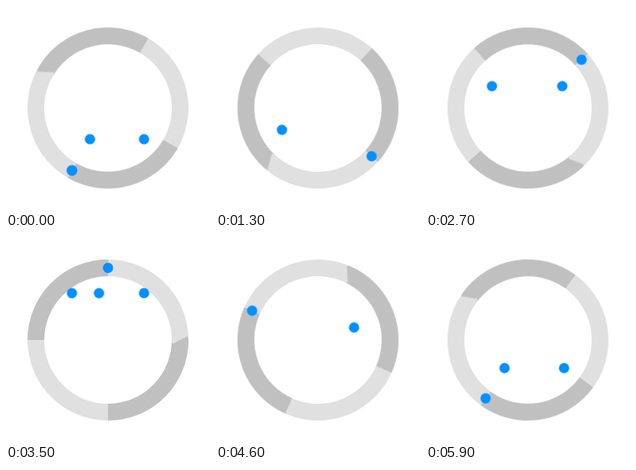
Animation, 256 px wide and 256 px high, one loop 6 s. Source, as an HTML page:

```html
<!DOCTYPE html>
<html lang="en">
<head>
<meta charset="utf-8">
<title>Straight flights inside a rotating ring</title>
<style>
  html, body { margin: 0; width: 100%; height: 100%; overflow: hidden; background: #fff; }
  svg { display: block; width: 100%; height: 100%; }

  .ring { fill: none; stroke-width: 21; }
  .light { stroke: #e0e0e0; }
  .dark { stroke: #c0c0c0; stroke-dasharray: 1 1; }
  .dot { fill: #0090ff; }

  /* The picture advances in 100 ms ticks. */
  .spin, .long, .short { animation: 6s infinite; animation-delay: calc(var(--start, 0s) - 2ms); }
  .spin { animation-name: spin; animation-timing-function: steps(60); }
  .long { animation-name: long; }
  .short { animation-name: short; --start: -4s; }
  .opposite .long { --start: -3s; }
  .opposite .short { --start: -1s; }

  @keyframes spin {
    from { transform: rotate(30deg); }
    to { transform: rotate(-330deg); }
  }
  /* Each dot leaves the rim, flies along a chord and is met by the rim again. */
  @keyframes long {
    0% { transform: translate(-45.25px, 78.375px); opacity: 1; animation-timing-function: steps(40); }
    66.6666% { transform: translate(-45.25px, -78.375px); opacity: 1; animation-timing-function: step-start; }
    66.6667%, 100% { transform: translate(-45.25px, -78.375px); opacity: 0; }
  }
  @keyframes short {
    0% { transform: translate(90.5px, 0px); opacity: 1; animation-timing-function: steps(20); }
    33.3333% { transform: translate(-45.25px, -78.375px); opacity: 1; animation-timing-function: step-start; }
    33.3334%, 100% { transform: translate(-45.25px, -78.375px); opacity: 0; }
  }
</style>
</head>
<body>
<svg viewBox="0 0 256 256">
  <g transform="translate(128 128)">
    <circle class="ring light" r="90.5"/>
    <g class="spin">
      <circle class="ring dark" r="90.5" pathLength="4"/>
      <circle class="dot" cy="90.5" r="6.5"/>
    </g>
    <g>
      <circle class="dot long" r="6.5"/>
      <circle class="dot short" r="6.5"/>
    </g>
    <g class="opposite" transform="rotate(180)">
      <circle class="dot long" r="6.5"/>
      <circle class="dot short" r="6.5"/>
    </g>
  </g>
</svg>
</body>
</html>
```
